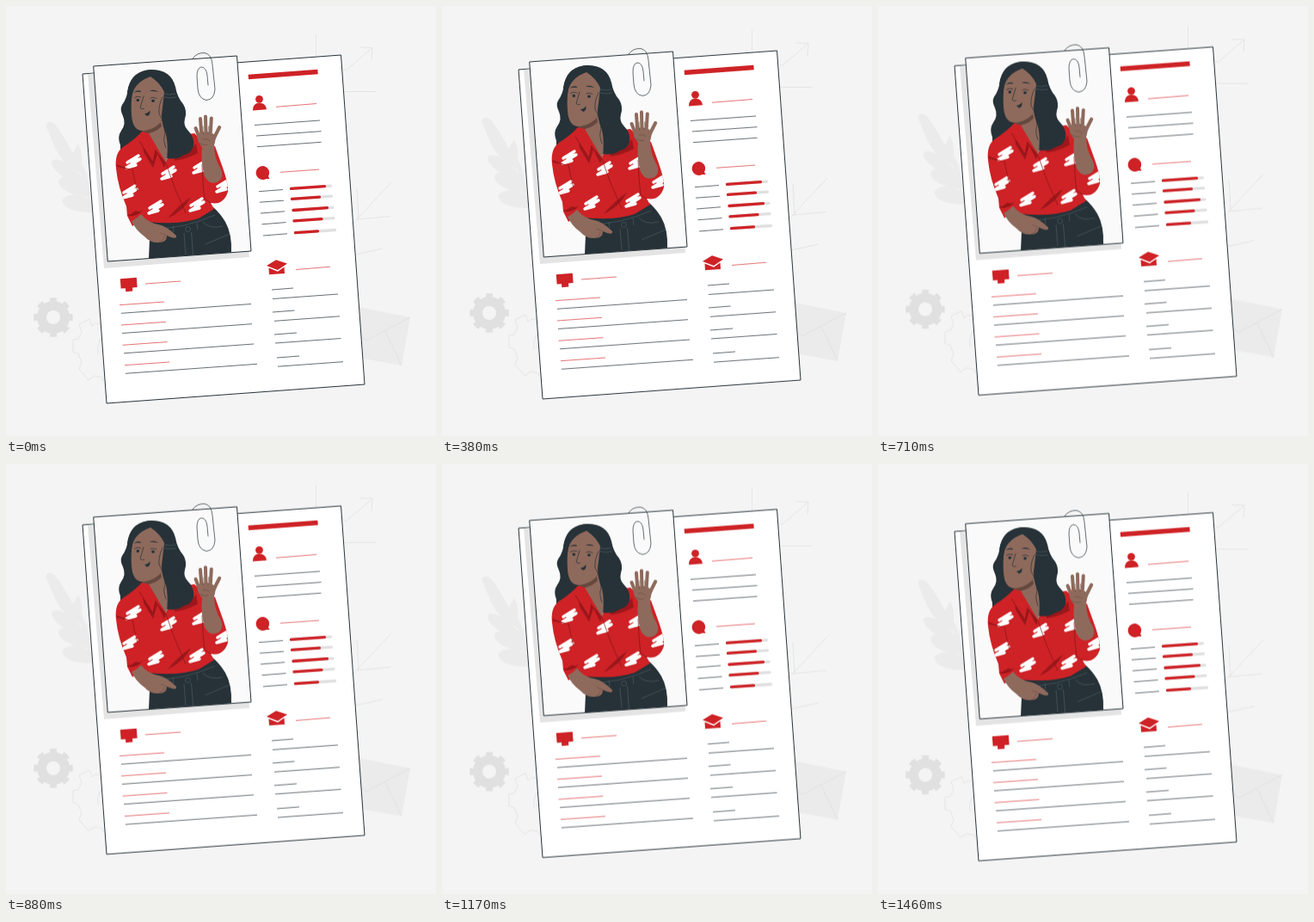
Animation of 500 by 500 pixels, one loop 1.5 s. Source, as an HTML page:

```html
<!DOCTYPE html>
<html lang="en">
<head>
<meta charset="utf-8">
<title>Resume</title>
<style>
html, body { margin: 0; width: 100%; height: 100%; overflow: hidden; background: #f4f4f4; }
svg { display: block; width: 100%; height: 100%; }
.float { animation: float 1.5s linear infinite; }
@keyframes float { 50% { transform: translateY(-10px); } }
.line { fill: none; stroke: #263238; stroke-width: .7; }
.thin { fill: none; stroke: #263238; stroke-width: .7; stroke-linecap: round; stroke-linejoin: round; }
.faint { fill: none; stroke: #dedede; stroke-width: .7; }
.redline { fill: none; stroke: #d8262b; stroke-width: .65; }
.bar { fill: none; stroke-width: 3.3; stroke-linecap: round; }
.red { fill: #ce2226; }
.deep { fill: #9c171b; }
.skin { fill: #8e6a5c; }
.dark { fill: #263238; }
.pale { fill: #ebebeb; }
.edge { stroke: #263238; stroke-width: 1; }
.finger { fill: none; stroke: #8e6a5c; stroke-width: 4; stroke-linecap: round; }
.crease { fill: none; stroke: #6b4a40; stroke-width: .6; stroke-linecap: round; }
.seam { fill: none; stroke: #53636b; stroke-width: .6; }
</style>
</head>
<body>
<svg viewBox="0 0 500 500">
<defs>
  <path id="shirt" d="M158 146Q150 155 136 164Q126 171 128 189Q130 210 140 233L141 244L147 256L160 247L165 251Q200 255 224 247L242 236L238 229Q253 232 258 216Q259 208 252 188L243 163L232 160L219 148L206 150L186 182L166 148Z"/>
  <clipPath id="inShirt"><use href="#shirt"/></clipPath>
  <path id="mark" d="M-7 1L6 -7L-3 0L8 -3L-8 7L3 4" fill="none" stroke="#fff" stroke-width="3.4" stroke-linecap="round" stroke-linejoin="round"/>
</defs>

<g class="float">
  <!-- backdrop -->
  <g class="pale">
    <path d="M47 141Q45 134 53 135Q60 138 76 168Q88 190 85 194Q66 184 57 165Z"/>
    <path d="M84 160Q91 174 87 196Q75 184 77 172Z"/>
    <path d="M53 180Q60 175 73 185Q88 196 96 208Q74 206 62 195Q52 187 53 180Z"/>
    <path d="M61 203Q65 195 82 200L97 212L99 222Q82 222 70 215Q60 209 61 203Z"/>
    <path d="M65 226Q71 217 87 220L101 227V240Q77 240 68 232Z"/>
    <path d="M84 180Q98 190 98 240L92 212Z"/>
    <path d="M405 349L470 362L460 418L400 407Z"/>
  </g>
  <path class="faint" d="M470 362L419 389L408 380M441 378L460 418"/>
  <g fill="none" stroke="#e0e0e0">
    <circle cx="55" cy="362" r="13.5" stroke-width="11"/>
    <circle cx="55" cy="362" r="20.3" stroke-width="5" pathLength="16" stroke-dasharray="1" stroke-dashoffset=".5"/>
  </g>
  <path class="faint" d="M110 370L104 369L100 372L97 364L85 370L88 379L84 387L78 388L78 402L84 404L88 414L85 422L96 435L103 430L112 432L113 436M112 386Q105 392 107 405"/>
  <path class="faint" d="M360.500 33V60M390 71L395 75L425.500 49M411 48L426 48.500L425 63M392 99.500H431M407 249L448 205M408 212L410 247L407 249M409 248L447 244.500M406 289L438 282"/>

  <!-- sheet -->
  <path class="edge" fill="#fff" d="M89 79L389.500 57L417 440L117 462Z"/>
  <path fill="#e4e4e4" d="M95 79L264 67L283 292L114 305Z"/>

  <!-- right column -->
  <path class="red" d="M281.600 79.700L362.300 73.700L362.800 79.200L282.100 85.200Z"/>
  <g class="red">
    <circle cx="294.500" cy="108.300" r="4.400"/>
    <path d="M287 121.500Q287 113 294.500 112.800Q302 112.500 303 120.300Z"/>
    <path d="M299 186A8 8 0 1 0 302.500 201L306.500 201L305 198A8 8 0 0 0 299 186Z"/>
    <path d="M303 302L314 295.300L327 299.500L316 307Z"/>
    <path d="M305.500 304.500L316 308.800L323.500 303.500L324 311L306 312.300Z"/>
  </g>
  <path class="redline" d="M314 117.300l47-3.800M319 193.300l45-3.200M337 306.500l40-3.300"/>
  <path class="line" d="M289 138.500l76-5.500M291 151l75.500-5.300M292 163.700l74.500-5.400"/>
  <path class="line" d="M294 215.700l28-2.200M295 228.200l28-2M296 241l28-2.200M297.500 253.800l28-2.200M299 267l28-2.200"/>
  <path class="bar" stroke="#e0e0e0" d="M331.500 212.300l46-3.200M332.500 224.400l46-3.200M334 237.500l46-3.200M335 249.800l46-3.200M336.500 263.700l46-3.200"/>
  <path class="bar" stroke="#ce2226" d="M331.500 212.300l39-2.700M332.500 224.400l32-2.200M334 237.500l39.500-2.800M335 249.800l32-2.200M336.500 263.700l26-1.800"/>
  <path class="line" d="M309 330l25-2M310 340.500l76-5.500M310 356l25.500-2M312 366.300l76-5.500M312 382l26-2M313 392l76.500-5.500M315 409l26-2M316 419.200l76-5.500"/>

  <!-- lower left -->
  <path class="red" d="M132.800 317.300L151.800 315.800L152.600 327L147 327.500L147.300 331.500L139.300 332.200L139 328.200L133.600 328.600Z"/>
  <path class="redline" d="M162 323l41-3M132 347.700l52-3.700M134 371l52-3.700M135.500 394.300l52-3.700M138 417.700l52-3.700"/>
  <path class="line" d="M134 357.300l151-10.800M135 380.500l151-10.800M137 403.800l151-10.800M139 427.300l153-11"/>

  <!-- photo -->
  <path class="edge" fill="#fafafa" d="M101.700 70L268.500 58L285 285L118.300 297Z"/>

  <!-- back hair -->
  <path class="dark" d="M169 74Q147 75 142 95Q141 107 135 115Q132 120 136 128Q140 137 134 145Q129 152 133 162L133 172L158 158L190 170L188 80Z"/>

  <!-- trousers -->
  <path class="dark" d="M168 250L166 293.400L262 286.600Q263 265 255 251Q249 241 241 234Z"/>
  <g class="seam">
    <circle cx="211.500" cy="259.500" r="3"/>
    <path d="M172 259Q207 259 243 243M207 264L209 289M215.500 263L217.500 289M194 256l1 7M222 252l1 8M229 251Q236 260 252 256M232 277L260 265"/>
  </g>

  <!-- torso -->
  <path class="skin" d="M158 143L182 133Q184 148 191 155L186 183L163 158Z"/>
  <path fill="#64483e" d="M159 145Q170 144 180 135L181 140Q173 148 161 149Z"/>
  <use href="#shirt" class="red"/>
  <g clip-path="url(#inShirt)">
    <use href="#mark" x="148" y="181"/>
    <use href="#mark" x="189" y="194"/>
    <use href="#mark" x="144" y="216"/>
    <use href="#mark" x="174" y="234"/>
    <use href="#mark" x="222" y="231"/>
    <use href="#mark" x="226" y="187"/>
    <use href="#mark" x="253" y="209"/>
    <path class="deep" d="M188 247Q198 234 215 222Q207 238 188 247ZM142 244Q150 245 157 240L151 238ZM184 176Q207 178 221 160L223 171Q205 181 187 180Z"/>
    <path class="deep" d="M128 184L148 191L129 187Z"/>
  </g>
  <path d="M158 149L186 182L184 188L176 172L171 188L160 170Z" class="deep"/>
  <path d="M157.500 146L174 167L171 182L155 157Z" class="red"/>
  <path d="M186 181L193 164L196 180L189 189Z" class="red"/>
  <path fill="none" stroke="#851519" stroke-width=".7" d="M186 183Q195 211 209 241M147 190Q150 206 153 216M228 184Q229 211 231 224L238 229M141 243Q150 244 158 238M174 167L171 182L155 157"/>

  <!-- hand on hip -->
  <path class="skin" d="M146 250Q151 248 157 242Q165 252 177 254Q187 256 198 267Q199 271 192 269L187 267Q187 275 178 275Q168 276 161 268Q151 261 146 250Z"/>
  <path class="crease" d="M187 267L180 264M178 275Q184 272 184 268"/>

  <!-- face -->
  <path class="skin" d="M168 81Q150 88 147 99Q145 112 146 127Q147 143 157 145Q169 145 178 137L185 128L185 96Z"/>
  <circle class="dark" cx="153.300" cy="109.500" r="1.800"/>
  <circle class="dark" cx="171" cy="110.300" r="1.800"/>
  <path class="thin" stroke-width="1" d="M149.500 106.500Q153 104 157 106M168 107Q171 105 175 107.500"/>
  <path class="thin" d="M160 105Q158 112 156 118.500Q158 120.500 160.500 119.500"/>
  <path d="M148.500 101Q152 97 157 99L156.800 100Q152 99 148.500 101ZM167 99Q172 96 177 100Q172 98.500 167 99Z" class="dark"/>
  <path class="dark" d="M160.500 125Q164 126 167.500 121.500Q168 127 164 128Z"/>

  <!-- front hair -->
  <path class="dark" d="M169 74Q192 74 197 94Q199 106 206 114Q211 122 208 131Q206 139 211 144Q220 153 218 163Q215 172 207 173Q199 179 187 177Q189 163 186 149Q181 137 181 126Q183 110 184 100Q179 89 168 82Q151 88 147 102L144 118L141 100Q146 75 169 74Z"/>
  <path class="thin" d="M182 106Q177 116 178 125Q185 137 185 149Q182 155 186 165"/>
  <path class="seam" d="M184 102Q190 104 197 102M184 106Q191 108 198 106"/>

  <!-- waving hand -->
  <path class="skin" d="M223 149Q233 143 243 150Q244 157 242 162Q242 177 250 190Q254 201 245 205Q236 208 231 198Q226 181 228 164Q221 157 223 149Z"/>
  <path class="finger" d="M227.500 153L226 131M232.500 151L232 128.500M237.500 152L238.800 130.500M241 156Q244 149 248.200 141M226 156L220.500 142"/>
  <path class="crease" d="M229.500 149L229 140M235 148.500L235.500 140M229 155Q234 154 237 157M224 159Q230 163 235 161"/>

  <!-- paperclip -->
  <path class="thin" d="M217 61Q222 54 231 54.500Q239 56 240 68L243 97Q242 109 233 109.500Q224 108 223 96L222 82Q222 72 227 71Q233 71 234 81L235 92"/>
</g>
</svg>
</body>
</html>
```
